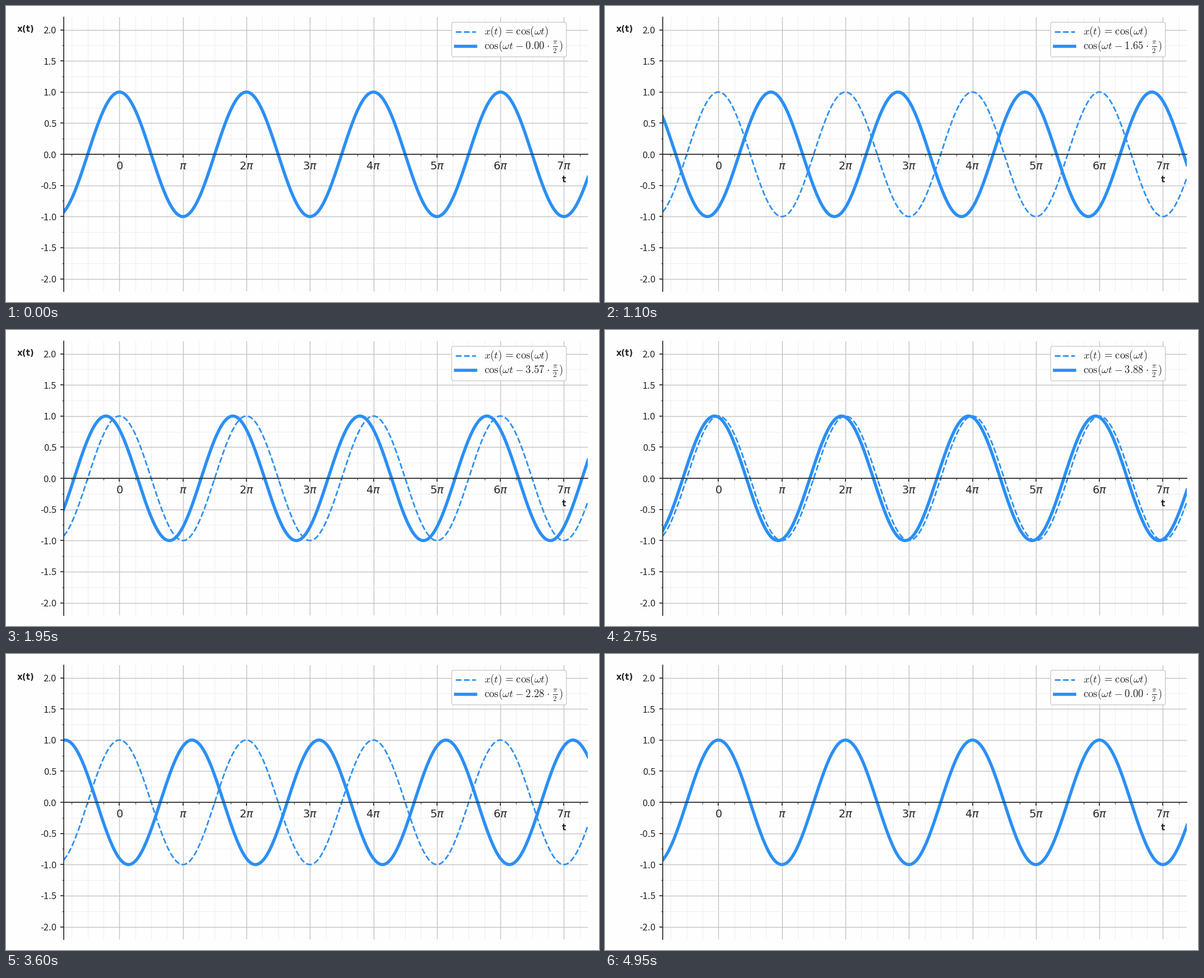
Animation of 1058x529 px, one loop 5000 ms. Source, as a matplotlib script:

```python
import numpy as np
import matplotlib.pyplot as plt
from matplotlib.animation import FuncAnimation
from matplotlib.patches import FancyBboxPatch
from matplotlib.ticker import MultipleLocator

W, H, DPI = 1058, 529, 100
FRAMES, INTERVAL = 100, 50
PAPER, INK, BLUE = "#fefefe", "#262626", "#2b8ff5"
MAJOR, MINOR = "#c3c3c3", "#ededed"
LEFT, RIGHT, TOP, BOTTOM = 103, 1038, 20.3, 509.8
ZERO_X, PI_PX = 202.4, 113.28
DASHED = dict(color=BLUE, linewidth=2, linestyle=(0, (3.7, 1.55)))
SOLID = dict(color=BLUE, linewidth=4, solid_capstyle="projecting")
PI = np.pi

fig = plt.figure(figsize=(W / DPI, H / DPI), dpi=DPI, facecolor=PAPER)

# Plot area
ax = fig.add_axes([LEFT / W, 1 - BOTTOM / H, (RIGHT - LEFT) / W, (BOTTOM - TOP) / H],
                  facecolor=PAPER)
ax.set_xlim((LEFT - ZERO_X) / PI_PX * PI, (RIGHT - ZERO_X) / PI_PX * PI)
ax.set_ylim(-2.2, 2.2)
ax.set_axisbelow(True)

ax.spines[["top", "right"]].set_visible(False)
ax.spines["bottom"].set_position(("data", 0))
for side in ("left", "bottom"):
    ax.spines[side].set(color=INK, linewidth=1.2)

names = ["$0$", r"$\pi$"] + [rf"${n}\pi$" for n in range(2, 8)]
ax.set_xticks(np.arange(8) * PI, names)
ax.xaxis.set_minor_locator(MultipleLocator(PI / 4))
levels = np.arange(-4, 5) / 2
ax.set_yticks(levels, [f"{v:.1f}" for v in levels])
ax.yaxis.set_minor_locator(MultipleLocator(0.25))

ax.tick_params(which="major", length=4.3, width=1.2, color=INK, labelcolor=INK)
ax.tick_params(which="minor", length=2.2, width=0.8, color=INK)
ax.tick_params(axis="x", labelsize=14, pad=4.5)
ax.tick_params(axis="y", labelsize=12, pad=5)
for label in ax.get_yticklabels():
    label.set_fontfamily(["Noto Sans CJK JP", "Liberation Sans"])
ax.grid(which="major", color=MAJOR, linewidth=1)
ax.grid(which="minor", color=MINOR, linewidth=0.7)

# Curves; the thick one runs past both edges so its caps stay hidden
t = np.linspace(*ax.get_xlim(), 1200)
ax.plot(t, np.cos(t), scalex=False, scaley=False, **DASHED)
t_wide = np.linspace(t[0] - 0.3, t[-1] + 0.3, 1200)
wave, = ax.plot(t_wide, np.cos(t_wide), scalex=False, scaley=False, **SOLID)

# The t label sits below the curves, like the tick labels
ax.annotate("t", (7 * PI, 0), xytext=(0, -35.7), textcoords="offset points",
            ha="center", va="baseline", size=11, weight="bold", color=INK, zorder=0.6)

# Legend and axis name in pixel coordinates
top = fig.add_axes([0, 0, 1, 1], facecolor="none")
top.set(xlim=(0, W), ylim=(H, 0))
top.axis("off")
top.text(19.5, 46.3, "x(t)", size=10.9, weight="bold", color=INK)
top.add_patch(FancyBboxPatch((798.5, 32.5), 198, 55, boxstyle="round,pad=3.3",
                             facecolor=PAPER, edgecolor="#cccccc", linewidth=1))
top.plot([802.2, 838.4], [45.6, 45.6], **DASHED)
top.plot([802.2, 838.4], [72, 72], **SOLID)


def formula(y, text=""):
    return top.text(852.7, y, text, size=13.5, color=INK, va="baseline",
                    math_fontfamily="cm")


# Extra room around relations and operators
REL, OP, FRAC = (rf"\hspace{{{w}}}" for w in (0.11, 0.06, 0.14))
formula(50.5, rf"$x(t){REL} = {REL}\cos(\omega t)$")
shifted = formula(77)


def update(i):
    quarter_turns = 2 * (1 - np.cos(2 * PI * i / (FRAMES - 1)))
    wave.set_ydata(np.cos(t_wide - quarter_turns * PI / 2))
    shifted.set_text(rf"$\cos(\omega t{OP} - {OP}{abs(quarter_turns):.2f}"
                     rf"{OP} \cdot {FRAC}\frac{{\pi}}{{2}}{OP})$")
    return wave, shifted


anim = FuncAnimation(fig, update, frames=FRAMES, interval=INTERVAL,
                     repeat=True, repeat_delay=0, blit=False)
plt.show()
```
